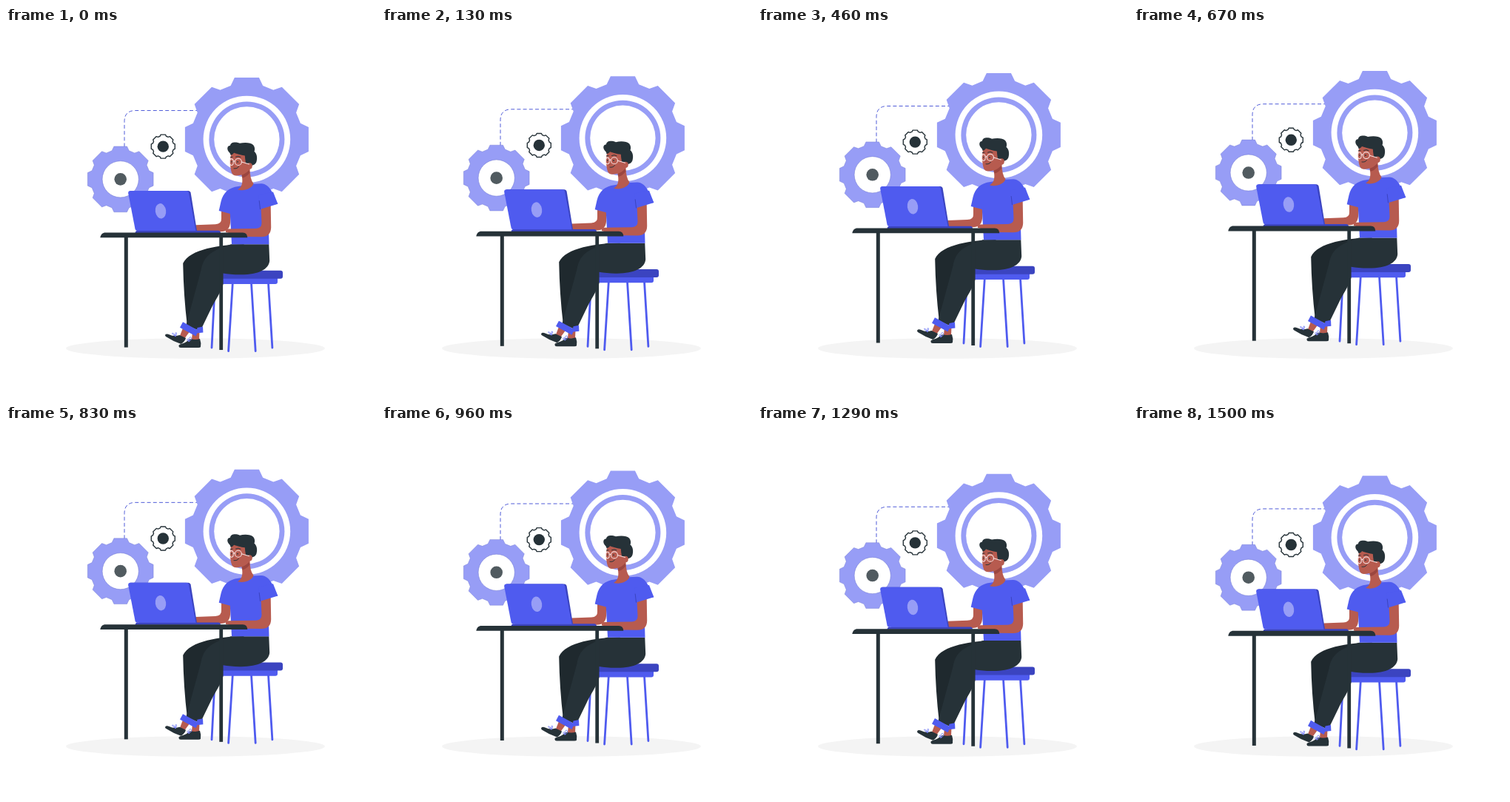
Recreate the animation shown at these times as an HTML page. Size 500 px wide and 500 px high, loop 1540 ms.

```html
<!DOCTYPE html>
<html lang="en">
<head>
<meta charset="utf-8">
<title>Working at the desk</title>
<style>
  html, body { margin: 0; width: 100%; height: 100%; overflow: hidden; background: #fff; }
  svg { display: block; width: 100vw; height: 100vh; }
  .blue { fill: #4f5bef; }
  .deep { fill: #3b44c0; }
  .pale { fill: #979df6; }
  .dark { fill: #263238; }
  .skin { fill: #b75b4f; }
  .white { fill: #fff; }
  .line { fill: none; stroke-linecap: round; stroke-linejoin: round; }
</style>
</head>
<body>
<svg viewBox="0 0 500 500">
  <ellipse cx="256" cy="433" rx="175" ry="13.7" fill="#f4f4f4"/>
  <g id="scene">
    <path class="line" d="M160 161V127Q160 112 175 112H259" stroke="#4f5bd8" stroke-width="1" stroke-dasharray="5 3.2" style="stroke-linecap:butt"/>

    <g transform="translate(325.4 150.9)">
      <path class="pale" data-gear="83.5"/>
      <circle class="white" r="58.8"/>
      <circle class="pale" r="51"/>
      <circle class="white" r="44.2"/>
    </g>
    <g transform="translate(154.7 204.8)">
      <path class="pale" data-gear="44.4" stroke="#6d75cf" stroke-width=".4"/>
      <circle class="white" r="24.6" stroke="#6d75cf" stroke-width=".5"/>
      <circle r="8.3" fill="#515b60"/>
    </g>
    <g transform="translate(212.3 160.6)">
      <path class="white" data-gear="16" stroke="#263238" stroke-width="1.4" stroke-linejoin="round"/>
      <circle class="dark" r="7.7"/>
    </g>

    <!-- stool -->
    <g class="line" stroke="#4f5bef" stroke-width="2.8">
      <path d="M282.5 345L278 432.5M306.3 345L300.6 437M331.5 345L337.2 437M354.5 345L359.9 432.5"/>
    </g>
    <path class="blue" d="M284 338H367V343.500Q367 346.500 364 346.500H284Z"/>
    <rect class="deep" x="282" y="328.200" width="92" height="11" rx="3"/>

    <!-- feet -->
    <path class="skin" d="M239 406L248 411L241 420.500L235 416.500Z"/>
    <path class="skin" d="M252 410H261.500L261 422H251Z"/>
    <path class="dark" d="M215.300 414.800Q217 413 220.500 414.600Q227 418 234.500 415.500L243 419.500Q242 424 236.500 427.500Q226 424 216 417.500Q214.500 416.500 215.300 414.800Z"/>
    <path class="dark" d="M233.500 430.500C233 427.500 238 427.500 242 425.500C246 423.500 247 421.500 250 420.800Q256 422.500 262 420.500Q264 426 263 431.500Q262.500 432.500 260 432.500H236Q233.500 432.500 233.500 430.500Z"/>
    <g class="line" stroke="#7c86fa" stroke-width="1">
      <path d="M229 417C223 414 224 411 227 414L229 417C228 411 231 411 230.500 414L229 417"/>
      <path d="M247 424C243 423 245 419 247.500 422L247 424C247 416 251 417 250.500 421Z"/>
    </g>

    <!-- trousers -->
    <path d="M322 292.600C290 293 248 299 239.200 318.500Q240 362 244.800 402L258 408L290 320Z" fill="#1f292e"/>
    <path class="dark" d="M304 292.800H355.300L356.200 315C355 327 341 333.500 318 333.800Q304 334 293.500 332V347C289 360 283 368 278 378L262.500 410L243.500 401.500L263.500 328C267 309 276 302 304 292.800Z"/>
    <path class="blue" d="M239 397.800L260 409.500L256.500 417L235 405.200Z"/>
    <path class="blue" d="M258.500 405.500L266 404L266.400 412L257 413Z"/>

    <!-- body -->
    <path class="skin" d="M291 246L303.500 249L303 264Q302 275.500 290 275.700H256.500V266.600L283 265.600Q291.500 265 291 258Z"/>
    <path class="blue" d="M314 214.500C301 216 293.500 223 290.500 235L287.700 247.500L302.800 251.500L305 292.800H355.500L354 240L367.300 238.200C361 225 357 211.500 345 210.700L332 211.200Z"/>
    <path class="skin" d="M344.500 242L357.700 239.500L358.200 270Q358 282.700 345 282.700L322 282.500Q307 279 297 276.500Q296 272.500 300 272L338 271.500Q345.500 271 345.500 264Z"/>
    <path class="blue" d="M341 226L361 222L367.300 238.200L343.500 245.500Z"/>
    <path class="line" d="M342.200 234L343.500 245.200" stroke="#3b44c0" stroke-width="1"/>

    <!-- head -->
    <path class="skin" d="M318.500 190H329.500Q329.500 205 334.500 210.500C333 217 322 221.500 313 219C318 216 321 211 318.500 199Z"/>
    <path d="M318.500 199Q325 197 328 192L329.500 196Q325 202 319.500 203Z" fill="#9b4640"/>
    <path class="skin" d="M304.500 169C302.500 178 302.500 189 305 196Q306.500 200 311 200C319 200 327 196 330 190L332 170Z"/>
    <path class="dark" d="M299.400 164.500C298.800 161 301 159.500 303 159.300C303.500 154.500 310 153.800 316 156.300C322 155 331 155 334.300 158.700C336.500 161.500 336.500 165 335.500 167.500C339 170 340 176 338.500 181C337.500 184.500 334 186.500 330.500 186.300L324 183Q323 177 322.800 173C317 172.500 312 170.500 308 169.300Q306.500 172 303.500 172.300C303.500 169 300 168 299.400 164.500Z"/>
    <ellipse class="skin" cx="328.800" cy="187" rx="4" ry="4.200"/>
    <g class="line" stroke="#263238" stroke-width="1">
      <path d="M310.500 174.600Q314 172.800 317 174.800M303.500 175L306 174.700"/>
      <path d="M308 190.300Q312.500 191 314.500 187.800"/>
    </g>
    <circle class="dark" cx="313" cy="181.300" r=".9"/>
    <circle class="dark" cx="304.800" cy="181.300" r=".8"/>
    <path class="line" d="M308 181.500L306.500 186.500L308.500 187" stroke="#9b4640" stroke-width=".8"/>
    <g class="line" stroke="#f6dede" stroke-width="1.100">
      <circle cx="313.900" cy="181.400" r="4.500"/>
      <ellipse cx="304.800" cy="181.600" rx="2.500" ry="4.300"/>
      <path d="M307.300 180.800Q308.500 179.700 309.500 180.800M318.400 181.500L328.500 184.500"/>
    </g>

    <!-- laptop -->
    <path class="deep" d="M177 274.200H287Q290 274.500 290 277.500H174.500Q174.500 275 177 274.200Z"/>
    <path class="deep" d="M168 220.500H246.500Q249 220.500 249.600 223L258 274.500H180Z"/>
    <path class="blue" d="M168 220.500H244Q246.500 220.500 247 223L256.500 274.500H177.500Q175 274.500 174.500 272L165.200 224Q164.800 220.500 168 220.500Z"/>
    <ellipse class="pale" cx="209" cy="247.800" rx="7.200" ry="10.300" transform="rotate(-8 209 247.800)"/>

    <!-- table -->
    <path class="dark" d="M127.300 283.700C128 279.500 130.500 276.900 134.500 276.900H320Q326 277 326.300 283.700Z"/>
    <rect class="dark" x="159.800" y="283" width="5" height="149"/>
    <rect class="dark" x="288.300" y="283" width="4.800" height="152.500"/>
  </g>
</svg>
<script>
  const LOOP = 1540, TOP = 725, LOW = 1505, LIFT = 10;
  const scene = document.getElementById('scene');

  // Eight flat-topped teeth; half is the distance from centre to a tooth top.
  function gear(half) {
    const shape = [[-16.7, .907], [-11.2, 1.0194], [11.2, 1.0194], [16.7, .907]];
    const pts = [];
    for (let tooth = 0; tooth < 8; tooth++) {
      for (const [deg, k] of shape) {
        const a = (tooth * 45 + deg) * Math.PI / 180, r = half * k;
        pts.push((r * Math.sin(a)).toFixed(2) + ' ' + (-r * Math.cos(a)).toFixed(2));
      }
    }
    return 'M' + pts.join('L') + 'Z';
  }

  for (const path of document.querySelectorAll('[data-gear]')) {
    path.setAttribute('d', gear(+path.dataset.gear));
  }

  // Steady rise to TOP, steady fall to LOW.
  function lift(t) {
    if (t >= TOP && t < LOW) return LIFT * (LOW - t) / (LOW - TOP);
    const since = (t - LOW + LOOP) % LOOP;
    return LIFT * since / (LOOP - LOW + TOP);
  }

  function draw(t) {
    scene.setAttribute('transform', `translate(0 ${(-lift(t)).toFixed(3)})`);
  }

  let start;
  function tick(now) {
    if (start === undefined) start = now;
    draw((now - start) % LOOP);
    requestAnimationFrame(tick);
  }
  draw(0);
  requestAnimationFrame(tick);
</script>
</body>
</html>
```
